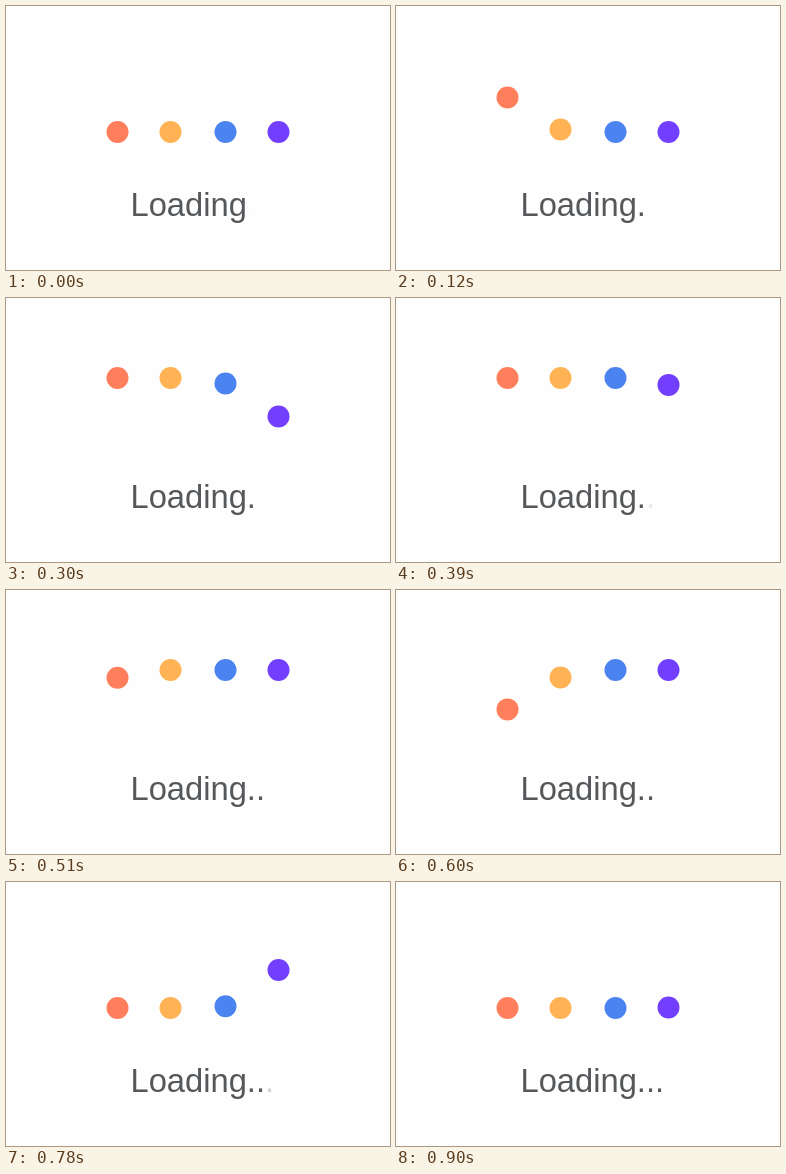
An HTML page that plays this animation: 384x264 px, repeating every 930 ms.

```html
<!DOCTYPE html>
<html lang="en">
<head>
<meta charset="utf-8">
<title>Loading</title>
<style>
  html, body { margin: 0; height: 100%; overflow: hidden; background: #fefefe; }
  svg { display: block; width: 384px; height: 264px; }
  text { font: 32.7px "Liberation Sans", Arial, sans-serif; fill: #55585b; }
</style>
</head>
<body>
<svg viewBox="0 0 384 264">
  <g id="balls">
    <circle cx="111.5" r="11" fill="#ff7f5c"/>
    <circle cx="164.5" r="11" fill="#ffb354"/>
    <circle cx="219.5" r="11" fill="#4b83f0"/>
    <circle cx="272.5" r="11" fill="#733fff"/>
  </g>
  <text x="124.5" y="210">Loading<tspan>.</tspan><tspan>.</tspan><tspan>.</tspan></text>
</svg>
<script>
  const LOOP = 930, MOVE = 180, FADE = 120;
  const LOW = 126, HIGH = 80;
  const riseAt = [0, 96, 160, 255];
  const fallAt = [464, 555, 622, 733];
  const dotAt = [0, 375, 750];

  const balls = document.querySelectorAll('#balls circle');
  const dots = document.querySelectorAll('tspan');

  const progress = (t, start, length) => Math.min(1, Math.max(0, (t - start) / length));
  const ease = p => p * p * (3 - 2 * p);

  function draw(now) {
    const t = now % LOOP;
    balls.forEach((ball, i) => {
      const lift = ease(progress(t, riseAt[i], MOVE)) - ease(progress(t, fallAt[i], MOVE));
      ball.setAttribute('cy', LOW + (HIGH - LOW) * lift);
    });
    dots.forEach((dot, i) => dot.setAttribute('fill-opacity', progress(t, dotAt[i], FADE)));
    requestAnimationFrame(draw);
  }
  draw(0);
</script>
</body>
</html>
```
